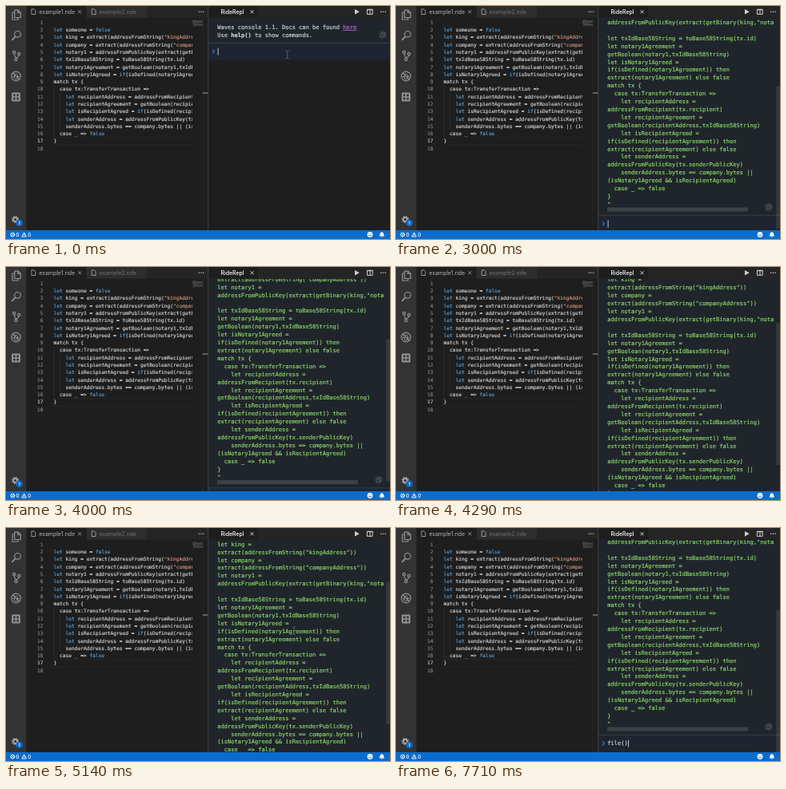
An HTML page that plays this animation: 480 px wide and 292 px high, repeating every 8 s.

```html
<!DOCTYPE html>
<html lang="en">
<head>
<meta charset="utf-8">
<title>Ride console</title>
<style>
html, body { margin: 0; width: 100%; height: 100%; overflow: hidden; background: #1e1e1e; }
svg { display: block; width: 100vw; height: 100vh; }
text { white-space: pre; }
.code, .term, tspan { fill: currentColor; stroke: currentColor; stroke-width: .16; }
.code { font: 6.21px "DejaVu Sans Mono", monospace; color: #d4d4d4; }
.term { font: 7.06px "DejaVu Sans Mono", monospace; color: #d3d7db; }
.ui { font: 6.95px Inter, sans-serif; }
.out { color: #8bdb68; }
.word { color: #569cd6; }
.str { color: #ce9178; }
.num { color: #858585; }
.now { color: #c6c6c6; }
.line { fill: none; stroke-linecap: round; stroke-linejoin: round; }
</style>
</head>
<body>
<svg viewBox="0 0 480 292" xmlns="http://www.w3.org/2000/svg">
  <defs>
    <clipPath id="codeClip"><rect x="25" y="15" width="208" height="266"/></clipPath>
    <clipPath id="termClip"><rect x="253" y="15" width="227" height="266"/></clipPath>
    <clipPath id="wrapClip"><rect x="253" y="-200" width="219.5" height="900"/></clipPath>
    <g id="copy">
      <circle r="5.6" fill="#2b3037"/>
      <path class="line" stroke="#575d65" stroke-width=".8" d="M-1.2-1.2V-2.8H2.6V1.6H1.2M-2.6-1.2H1.2V2.9H-2.6Z"/>
    </g>
    <path id="close" class="line" stroke-width=".9" d="M-1.7-1.7L1.7 1.7M1.7-1.7L-1.7 1.7"/>
    <path id="file" class="line" stroke-width=".8" d="M-2.2-3.3H.7L2.3-1.6V3.3H-2.2Z"/>
    <g id="dots"><circle cx="-2.7" r=".8"/><circle r=".8"/><circle cx="2.7" r=".8"/></g>
  </defs>

  <rect width="480" height="292" fill="#1e1e1e"/>
  <rect x="25" width="455" height="14.5" fill="#252526"/>

  <!-- left tabs -->
  <rect x="25" width="75.5" height="14.5" fill="#1e1e1e"/>
  <rect x="101" width="75" height="14.5" fill="#2d2d2d"/>
  <use href="#file" x="34.5" y="7.2" stroke="#b0b0b0"/>
  <text class="ui" x="41.3" y="9.5" fill="#b4b4b4">example1.ride</text>
  <use href="#close" x="92.2" y="7.3" stroke="#a0a0a0"/>
  <use href="#file" x="109.8" y="7.2" stroke="#b0b0b0"/>
  <text class="ui" x="116.6" y="9.5" fill="#727272">example2.ride</text>
  <use href="#dots" x="244" y="7.3" fill="#b8b8b8"/>

  <!-- editor -->
  <path class="line" stroke="#2a2a2a" stroke-width=".7" d="M58 164.8H233M58 174H233M246.3 15V281"/>
  <path class="line" stroke="#3a3a3a" stroke-width=".6" d="M60 99.5V164.5M67.2 109V155"/>
  <g id="code" clip-path="url(#codeClip)"></g>
  <g id="nums"></g>
  <g id="map" fill="#8b8b8b" opacity=".6"></g>
  <rect x="246" y="108.5" width="6.5" height="1" fill="#a5a5a5"/>

  <!-- console -->
  <g clip-path="url(#termClip)">
    <g id="page">
      <rect id="paper" x="253" y="14" width="227" fill="#20252c"/>
      <text class="term" x="264.3" y="29">Waves console 1.1. Docs can be found <tspan style="color:#c069dc" text-decoration="underline">here</tspan></text>
      <text class="term" x="264.3" y="39">Use <tspan font-weight="bold">help()</tspan> to show commands.</text>
      <use id="copyHead" href="#copy" y="36"/>
      <rect x="253" y="45.7" width="227" height=".9" fill="#35404d"/>
      <g id="result">
        <path class="line" stroke="#7d8792" stroke-width=".9" d="M258.4 55L260.6 57.1L258.4 59.2"/>
        <text class="term" x="264.3" y="59.5">contract()</text>
        <use href="#copy" x="466" y="57"/>
        <rect x="253" y="67" width="227" height=".9" fill="#2d353f"/>
        <path class="line" stroke="#a3abb4" stroke-width=".9" d="M259.6 75.9L257.4 78L259.6 80.1"/>
        <circle cx="261.4" cy="78" r=".8" fill="#a3abb4"/>
        <g id="out" clip-path="url(#wrapClip)"></g>
        <rect x="264" y="379.5" width="176" height="5" fill="#3d4248"/>
        <use href="#copy" x="466" y="379"/>
      </g>
      <g id="prompt">
        <rect x="253" y="-10.4" width="227" height="21" fill="#1e2530"/>
        <rect x="253" y="-11.2" width="227" height=".9" fill="#35404d"/>
        <path class="line" stroke="#2f80e4" stroke-width="1.1" d="M258.4-2.1L260.6 0L258.4 2.1"/>
        <text id="typed" class="term" x="264.3" y="2.4"></text>
        <rect id="caret" y="-4.4" width="1" height="9" fill="#c3c7cb"/>
      </g>
    </g>
    <rect id="thumb" x="475.2" width="4.8" height="178" fill="#797979" opacity=".25"/>
  </g>

  <!-- right tab -->
  <rect x="253" width="227" height="14.5" fill="#252526"/>
  <rect x="253" width="62" height="14.5" fill="#1e1e1e"/>
  <rect x="252.2" width="1" height="281" fill="#414141"/>
  <text class="ui" x="268.4" y="9.5" fill="#fff" font-weight="500" style="font-weight:500">RideRepl</text>
  <use href="#close" x="307.6" y="7.3" stroke="#eee"/>
  <path d="M436 4L441.7 7.3L436 10.6Z" fill="#d0d0d0"/>
  <path class="line" stroke="#d0d0d0" stroke-width="1" d="M451.8 4.3H458.2V10.3H451.8ZM455 4.3V10.3M451.8 4.7H458.2"/>
  <use href="#dots" x="471.5" y="7.3" fill="#d0d0d0"/>

  <!-- activity bar -->
  <rect width="25.5" height="281" fill="#333"/>
  <g class="line" stroke="#929292" stroke-width="1.2" transform="translate(.5 0)">
    <path d="M10.2 5.2H14.5L17.8 8.3V14.5H10.2ZM14.3 5.4V8.5H17.6M10 8H7.5V17H14.5V14.8"/>
    <circle cx="14" cy="35.3" r="3.8"/>
    <path stroke-width="1.8" d="M11 38.4L7.3 42.3"/>
    <circle cx="9.6" cy="58" r="1.6"/><circle cx="15.7" cy="60" r="1.6"/><circle cx="12" cy="67" r="1.6"/>
    <path d="M9.8 59.8Q10.2 63 12 65.2M15.4 61.8Q14.8 64 12.4 65.2"/>
    <circle cx="12" cy="88" r="5.8"/>
    <path d="M8 84L16 92"/>
    <path stroke-width="1" d="M10 87.8V91Q12 93 14 91V86.8M10.4 85.6Q12 83.8 13.6 85.6M8.2 88.5H9.9M14 88.5H15.8"/>
    <path stroke-width="2" d="M7.6 109.4H16.4V118.6H7.6Z"/>
    <path stroke-width="1.7" d="M12 109.4V118.6M7.6 114H16.4"/>
  </g>
  <circle cx="11.6" cy="267.5" r="2.5" fill="none" stroke="#a8a8a8" stroke-width="1.8"/>
  <circle cx="11.6" cy="267.5" r="3.9" fill="none" stroke="#a8a8a8" stroke-width="1.4" stroke-dasharray="1.53 1.53"/>
  <circle cx="16.6" cy="271.8" r="4.3" fill="#0a6ccc"/>
  <text class="ui" x="16.5" y="273.8" fill="#fff" text-anchor="middle" style="font-size:5.2px;font-weight:600">1</text>

  <!-- status bar -->
  <rect y="281" width="480" height="11" fill="#0a6ccc"/>
  <g class="line" stroke="#fff" stroke-width=".9">
    <circle cx="8.3" cy="286.6" r="2.5"/>
    <path d="M7.3 285.6L9.3 287.6M9.3 285.6L7.3 287.6"/>
    <path d="M22.8 284.2L25.4 289H20.2ZM22.8 286V287.3"/>
  </g>
  <g class="ui" fill="#fff" style="font-size:6.2px;font-weight:500">
    <text x="12.6" y="288.9">0</text>
    <text x="27.2" y="288.9">0</text>
  </g>
  <circle cx="455" cy="286.5" r="3.4" fill="#fff"/>
  <path class="line" stroke="#0a6ccc" stroke-width=".9" d="M453.7 285.4V285.5M456.3 285.4V285.5M453.2 287.4Q455 289.4 456.8 287.4"/>
  <path d="M466.4 288.6Q467.5 287.6 467.5 285.8Q467.6 283.4 469.8 283.2Q472 283.4 472.1 285.8Q472.1 287.6 473.2 288.6ZM468.8 289H470.8Q469.8 290.6 468.8 289Z" fill="#fff"/>

  <path id="beam" class="line" stroke="#5c6269" stroke-width=".9" d="M-1.8-5Q0-5 0-3.8Q0-5 1.8-5M0-3.8V3.8M-1.8 5Q0 5 0 3.8Q0 5 1.8 5"/>
  <path id="arrow" fill="#111" stroke="#fff" stroke-width=".7" d="M0-4.2V3.3L1.7 1.8L2.9 4.4L4.2 3.8L3 1.3H5.2Z"/>
</svg>
<script>
const $ = id => document.getElementById(id);
const LOOP = 8000, STEP = 1000 / 7, CHAR = 4.25, BLINK = 500;

function add(parent, tag, attrs, content) {
  const el = document.createElementNS("http://www.w3.org/2000/svg", tag);
  for (const k in attrs) el.setAttribute(k, attrs[k]);
  if (content) el.textContent = content;
  return parent.appendChild(el);
}

const code = `
let someone = false
let king = extract(addressFromString("kingAddress"))
let company = extract(addressFromString("companyAddress"))
let notary1 = addressFromPublicKey(extract(getBinary(king,"nota
let txIdBase58String = toBase58String(tx.id)
let notary1Agreement = getBoolean(notary1,txIdBase58String)
let isNotary1Agreed = if(isDefined(notary1Agreement)) then
match tx {
  case tx:TransferTransaction =>
    let recipientAddress = addressFromRecipient(tx.recipient)
    let recipientAgreement = getBoolean(recipientAddress,
    let isRecipientAgreed = if(isDefined(recipientAgreement))
    let senderAddress = addressFromPublicKey(tx.senderPublicKey)
    senderAddress.bytes == company.bytes || (isNotary1Agreed
  case _ => false
}
`.split("\n");

function colour(part) {
  if (part[0] === '"') return { class: "str" };
  return /^(let|if|false)$/.test(part) ? { class: "word" } : {};
}

code.forEach((s, i) => {
  const y = 22.8 + i * 9.29;
  const row = add($("code"), "text", { class: "code", x: 59.6, y });
  s.split(/("\w+"?|\b(?:let|if|false)\b)/).forEach(part => {
    if (part) add(row, "tspan", colour(part), part);
  });
  add($("nums"), "text", {
    class: "code " + (i === 16 ? "now" : "num"), x: 46.5, y, "text-anchor": "end"
  }, String(i + 1));
  const pad = s.length - s.trimStart().length;
  add($("map"), "rect", {
    x: 233 + pad * .26, y: 17 + i * .52,
    width: Math.max(0, Math.min(50, s.length) - pad) * .26, height: .34
  });
});

const output = `"
let someone = false
let king =
extract(addressFromString("kingAddress"))
let company =
extract(addressFromString("companyAddress"))
let notary1 =
addressFromPublicKey(extract(getBinary(king,"notary1PK")))

let txIdBase58String = toBase58String(tx.id)
let notary1Agreement =
getBoolean(notary1,txIdBase58String)
let isNotary1Agreed =
if(isDefined(notary1Agreement)) then
extract(notary1Agreement) else false
match tx {
  case tx:TransferTransaction =>
    let recipientAddress =
addressFromRecipient(tx.recipient)
    let recipientAgreement =
getBoolean(recipientAddress,txIdBase58String)
    let isRecipientAgreed =
if(isDefined(recipientAgreement)) then
extract(recipientAgreement) else false
    let senderAddress =
addressFromPublicKey(tx.senderPublicKey)
    senderAddress.bytes == company.bytes ||
(isNotary1Agreed && isRecipientAgreed)
  case _ => false
}
"`.split("\n");

output.forEach((s, i) =>
  add($("out"), "text", { class: "term out", x: 264.3, y: 80.6 + i * 9.91 }, s));

// Interpolates [time, value] stops.
function track(stops, t) {
  let i = 0;
  while (i < stops.length - 2 && t >= stops[i + 1][0]) i++;
  const [t0, a] = stops[i], [t1, b] = stops[i + 1];
  const k = Math.min(1, Math.max(0, (t - t0) / (t1 - t0)));
  return a + (b - a) * k;
}

const ENTER = 3000, CLICK = 6000;
const commands = [
  { from: 0, text: "contract()", keys: [710, 860, 1000, 1140, 1430, 1570, 1710, 1860, 2570, 2710] },
  { from: ENTER, text: "file()", keys: [6860, 7000, 7140, 7290, 7570, 7710] }
];
const scroll = [[3000, 127], [3860, 127], [4290, 82], [4710, 37], [4860, 32], [5000, 42], [5290, 116], [5430, 130]];
const mouseX = [[5430, 360], [CLICK, 296]];
const mouseY = [[4710, 125], [5290, 130], [5430, 130], [CLICK, 270]];

function show(el, on) { el.setAttribute("display", on ? "inline" : "none"); }
function move(el, x, y) { el.setAttribute("transform", `translate(${x} ${y})`); }

function draw(now) {
  const t = Math.round(Math.floor(now / STEP + .035) * STEP / 10) * 10;
  const done = t >= ENTER;
  const cmd = commands[done ? 1 : 0];
  const pressed = cmd.keys.filter(k => k <= t + 5);
  const top = done ? track(scroll, t) : 0;
  const line = done ? 400 : 57;

  move($("page"), 0, -top);
  move($("prompt"), 0, line);
  $("paper").setAttribute("height", line - 3.4);
  show($("result"), done);
  show($("thumb"), done);
  $("thumb").setAttribute("y", 15 + top * .675);
  $("copyHead").setAttribute("x", done ? 466 : 471);

  $("typed").textContent = cmd.text.slice(0, pressed.length);
  const marks = [cmd.from, ...pressed];
  if (t >= CLICK) marks.push(CLICK);
  const idle = t - Math.max(...marks);
  show($("caret"), Math.floor(idle / BLINK) % 2 === 0 || (t >= 5290 && t < 5570));
  $("caret").setAttribute("x", 264.6 + pressed.length * CHAR);

  const first = t < 700;
  const later = t >= 4430 && t < 6850;
  const arrow = t >= 5280 && t < 5850;
  const x = first ? 351.6 : track(mouseX, t), y = first ? 61 : track(mouseY, t);
  show($("beam"), first || (later && !arrow));
  show($("arrow"), arrow);
  move($("beam"), x, y);
  move($("arrow"), x, y);
}

const start = performance.now();
function tick() {
  draw((performance.now() - start) % LOOP);
  requestAnimationFrame(tick);
}
tick();
</script>
</body>
</html>
```
